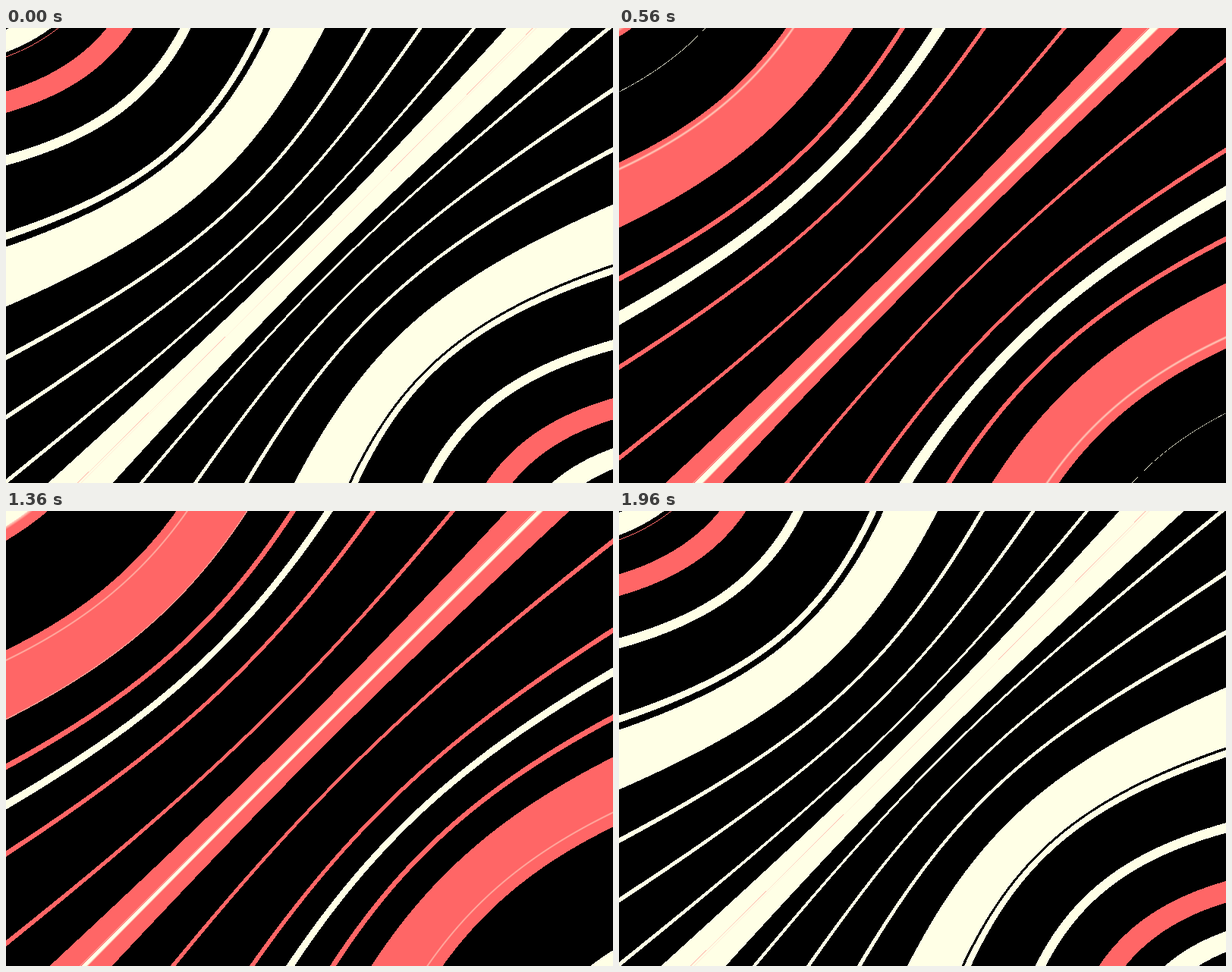
Write an HTML page with a canvas that moves like this. It is 800 by 600 pixels and loops after 2000 ms.

```html
<!DOCTYPE html>
<html lang="en">
<head>
<meta charset="utf-8">
<title>Bulging stripes</title>
<style>
  html, body { margin: 0; width: 100%; height: 100%; overflow: hidden; background: #000; }
  canvas { display: block; width: 800px; height: 600px; }
</style>
</head>
<body>
<canvas id="stage" width="800" height="600"></canvas>
<script>
const W = 800, H = 600, LOOP = 2000, STEP = 40, LEAD = 12;
const RED = [255, 102, 102], CREAM = [255, 255, 230], BLACK = [0, 0, 0];

const ctx = document.getElementById('stage').getContext('2d');
const image = ctx.createImageData(W, H);
const pixels = new Uint32Array(image.data.buffer);

// Stripes are looked up by their bent distance from the diagonal.
const REACH = 360, RES = 32;
const stripes = new Uint32Array(2 * REACH * RES + 1);

// Distance from the diagonal and squared distance from the centre.
const across = new Float32Array(W * H), radius2 = new Float32Array(W * H);
for (let y = 0, i = 0; y < H; y++) {
  for (let x = 0; x < W; x++, i++) {
    const dx = x + 0.5 - W / 2, dy = y + 0.5 - H / 2;
    across[i] = (dx + dy) * Math.SQRT1_2;
    radius2[i] = dx * dx + dy * dy;
  }
}

const clamp01 = v => Math.min(1, Math.max(0, v));
const pack = ([r, g, b]) => (255 << 24 | b << 16 | g << 8 | r) >>> 0;
const mix = (a, b, k) => a.map((v, i) => Math.round(v + (b[i] - v) * k));
const sigmoid = v => 1 / (1 + Math.exp(-v));

// Distance to the nearest of a set of evenly spaced lines.
const toLine = (s, period, offset = 0) => {
  const n = (s - offset) / period;
  return Math.abs(n - Math.round(n)) * period;
};

function fillStripes(swing, ease) {
  const wideCream = 17.3 - 15.3 * ease;
  const thin = ease + 0.25 * ease * (1 - ease);
  const redShift = 0.3 + 3.2 * swing;
  const SOFT = 1.6;
  for (let i = 0; i < stripes.length; i++) {
    const s = i / RES - REACH, a = Math.abs(s);

    const wideRed = 2.5 + 25.4 * swing + 0.003 * a;
    const thinRed = Math.max(swing * (2.8 + 0.0025 * a) - 0.05, 0.003 * (a - 220));
    const isRed = toLine(s, 236.5) < wideRed || toLine(s, 62.2, redShift) < thinRed;

    const thinCream = Math.max(-0.3, 1.15 - 2 * thin + (0.0045 - 0.0027 * thin) * a);
    let edge = thinCream - toLine(s, 35.8, -1.2);
    const wideEdge = wideCream - toLine(s, 157);
    // The upper half of the middle stripe lies beneath the red.
    const beneath = s < 0 && s > -80;
    if (!beneath) edge = Math.max(edge, wideEdge);

    let color = BLACK;
    if (isRed) color = mix(RED, CREAM, clamp01(0.65 + edge / SOFT));
    else if (edge > 0 || (beneath && wideEdge > 0)) color = CREAM;
    stripes[i] = pack(color);
  }
}

function draw(t) {
  const time = (t + LEAD) % LOOP;
  const phase = Math.min(time, LOOP - time) / (LOOP / 2);
  const swing = 0.5 - 0.5 * Math.cos(Math.PI * phase);
  const ease = sigmoid(17.3 * (phase - 0.491));
  const bulge = (299.5 + 125 * ease) ** -2;

  fillStripes(swing, ease);
  for (let i = 0; i < pixels.length; i++) {
    const s = across[i] / Math.sqrt(1 + radius2[i] * bulge);
    pixels[i] = stripes[((s + REACH) * RES + 0.5) | 0];
  }
  ctx.putImageData(image, 0, 0);
}

const start = performance.now();
let shown = -1;
function tick() {
  const elapsed = Math.max(0, performance.now() - start) % LOOP;
  const t = Math.floor(elapsed / STEP) * STEP;
  if (t !== shown) draw(shown = t);
  requestAnimationFrame(tick);
}
tick();
</script>
</body>
</html>
```
